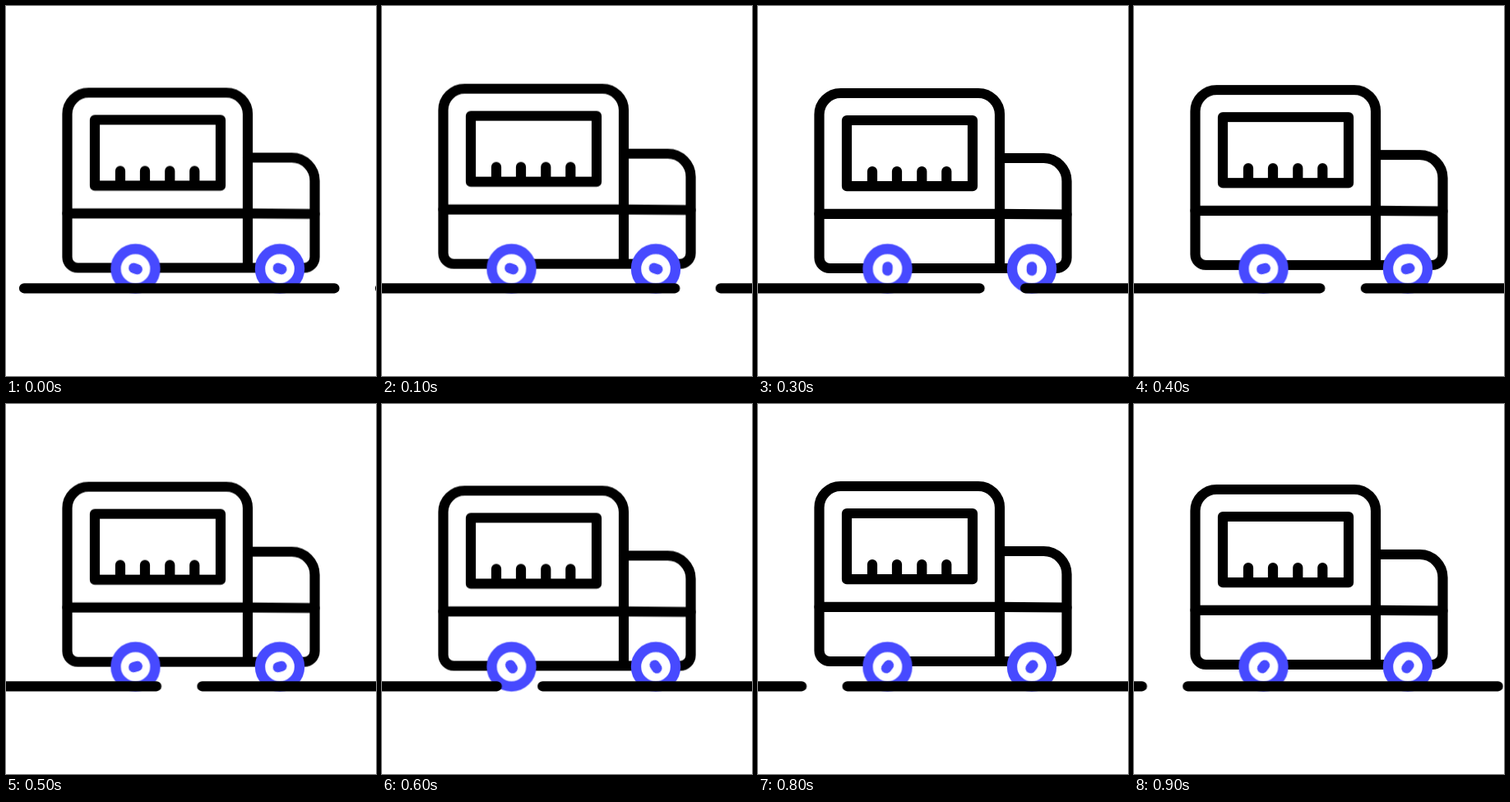
Recreate the animation shown at these times as an HTML page. Size 450 by 450 pixels, loop 1000 ms.

```html
<!DOCTYPE html>
<html lang="en">
<head>
<meta charset="utf-8">
<title>Food truck</title>
<style>
  html, body { margin: 0; width: 100%; height: 100%; overflow: hidden; background: #fff; }
  svg { display: block; width: 100%; height: 100%; }
  .line { fill: none; stroke: #000; stroke-width: 12.2; stroke-linecap: round; stroke-linejoin: round; }
  .rim { fill: #fff; stroke: #474aff; stroke-width: 12.4; }
  .hub { stroke: #474aff; stroke-width: 12.4; stroke-linecap: round; animation: spin 1s steps(10) infinite; }
  .road { animation: drive 1s steps(10) infinite; }
  .body { animation: bounce 1s step-end infinite; }

  @keyframes spin {
    from { transform: rotate(20deg); }
    to { transform: rotate(740deg); }
  }
  @keyframes drive {
    to { transform: translateX(-433px); }
  }
  /* three sine waves per loop, sampled ten times */
  @keyframes bounce {
    0%, 60%, 100% { transform: translateY(2.4px); }
    10%, 50% { transform: translateY(-2.4px); }
    20%, 40% { transform: translateY(-.9px); }
    30% { transform: translateY(3px); }
    70%, 90% { transform: translateY(.9px); }
    80% { transform: translateY(-3px); }
  }
</style>
</head>
<body>
<svg viewBox="0 0 450 450">
  <defs>
    <g id="wheel">
      <circle class="rim" r="24"/>
      <path class="hub" d="M-2.3 0H2.3"/>
    </g>
  </defs>

  <g class="line body">
    <path d="M333 316H87.500a13 13 0 0 1-13-13V129a26 26 0 0 1 26-26H268a26 26 0 0 1 26 26V316"/>
    <path d="M294 182H347.500a28 28 0 0 1 28 28V303a13 13 0 0 1-13 13H333"/>
    <path d="M74.500 249.800H294L375.500 250.500"/>
    <path d="M108 136H261V216.200H108Z"/>
    <path d="M139 198V216M169 198V216M199.300 198V216M229.300 198V216"/>
  </g>

  <use href="#wheel" x="157.500" y="319.500"/>
  <use href="#wheel" x="333" y="319.500"/>

  <path class="line road" d="M22 343.300H399.500M455 343.300H832.500"/>
</svg>
</body>
</html>
```
